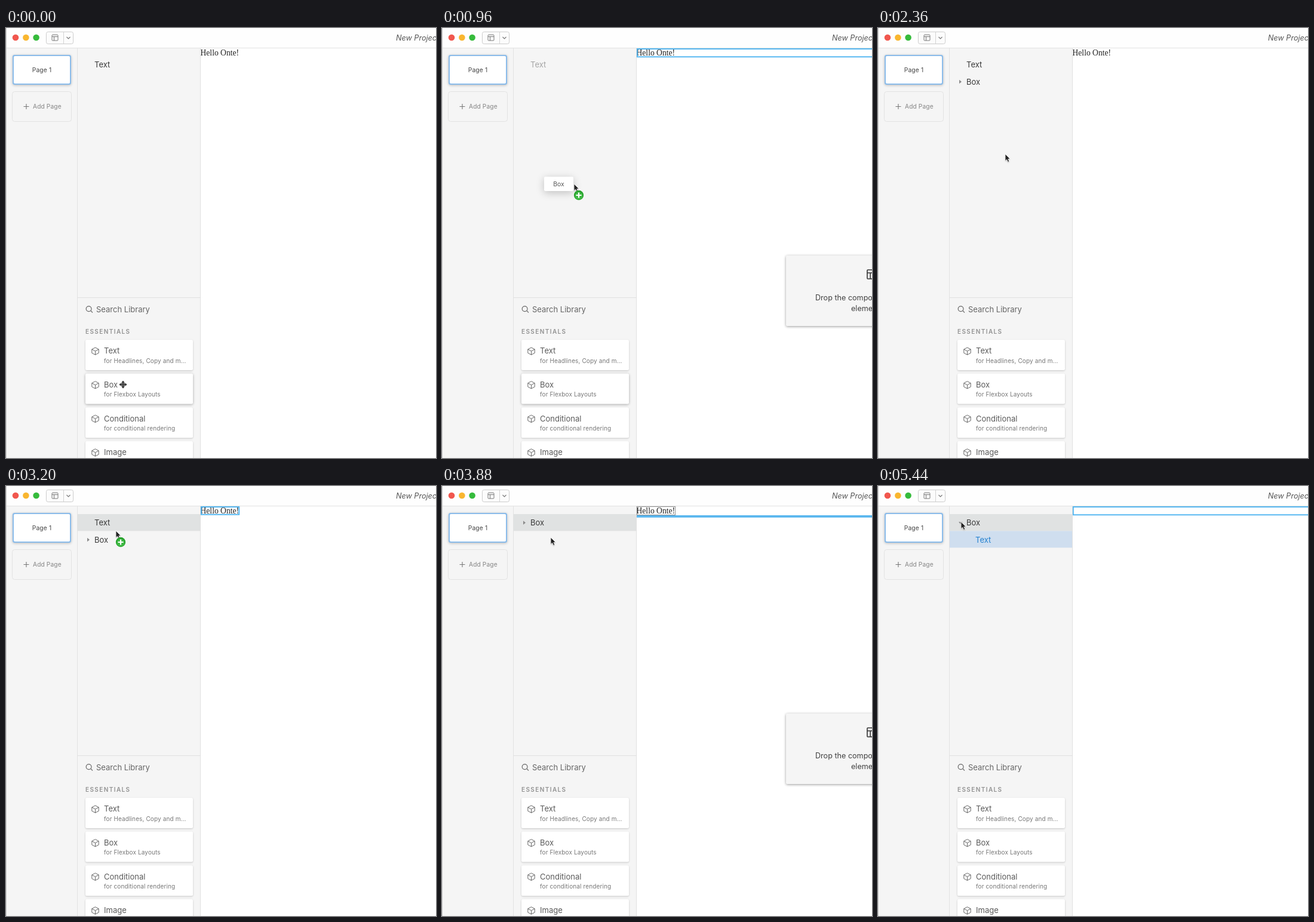
Write an HTML page with a canvas that moves like this. It is 720 px wide and 720 px high and loops after 5480 ms.

```html
<!DOCTYPE html>
<html lang="en">
<head>
<meta charset="utf-8">
<title>Page builder</title>
<style>
  html, body { margin: 0; width: 100%; height: 100%; overflow: hidden; background: #fff; }
  canvas { display: block; width: 720px; height: 720px; }
</style>
</head>
<body>
<canvas id="stage"></canvas>
<script>
const LOOP = 5480, STEP = 40;
const UI = 'Inter, "Open Sans", sans-serif';
const SERIF = '"Liberation Serif", serif';
const BLUE = '#50b5f1';

const canvas = document.getElementById('stage');
const ctx = canvas.getContext('2d');
const ratio = window.devicePixelRatio || 1;
canvas.width = canvas.height = 720 * ratio;

// Pointer path: time, x, y
const path = [
  [0, 196, 597], [320, 196, 597], [560, 198, 582], [760, 212, 410],
  [960, 221, 261], [1120, 222, 236], [1240, 222, 236], [1760, 213, 211],
  [2360, 213, 211], [2840, 184, 66], [3040, 184, 66], [3200, 184, 75],
  [3440, 182, 86], [4040, 182, 86], [4440, 156, 70], [4880, 139, 60],
  [LOOP, 139, 60]
];

function pointerAt(t) {
  const i = Math.max(1, path.findIndex(p => p[0] > t));
  const [t0, x0, y0] = path[i - 1], [t1, x1, y1] = path[i];
  const k = (t - t0) / (t1 - t0);
  return { x: x0 + (x1 - x0) * k, y: y0 + (y1 - y0) * k };
}

function rect(x, y, w, h, color) {
  ctx.fillStyle = color;
  ctx.fillRect(x, y, w, h);
}

function frame(x, y, w, h, color, width) {
  ctx.strokeStyle = color;
  ctx.lineWidth = width;
  ctx.strokeRect(x, y, w, h);
}

function round(x, y, w, h, r, fill, stroke, width = 1) {
  ctx.beginPath();
  ctx.roundRect(x, y, w, h, r);
  if (fill) { ctx.fillStyle = fill; ctx.fill(); }
  if (stroke) { ctx.strokeStyle = stroke; ctx.lineWidth = width; ctx.stroke(); }
}

function raised(x, y, w, h, r, fill, blur, drop, alpha) {
  ctx.save();
  ctx.shadowColor = `rgba(0,0,0,${alpha})`;
  ctx.shadowBlur = blur * ratio;
  ctx.shadowOffsetY = drop * ratio;
  round(x, y, w, h, r, fill);
  ctx.restore();
}

function disc(x, y, r, color) {
  ctx.beginPath();
  ctx.arc(x, y, r, 0, Math.PI * 2);
  ctx.fillStyle = color;
  ctx.fill();
}

// Strokes several polylines, each a flat list of coordinates
function lines(color, width, ...polys) {
  ctx.strokeStyle = color;
  ctx.lineWidth = width;
  ctx.beginPath();
  for (const p of polys) {
    ctx.moveTo(p[0], p[1]);
    for (let i = 2; i < p.length; i += 2) ctx.lineTo(p[i], p[i + 1]);
  }
  ctx.stroke();
}

function shape(points, color) {
  ctx.beginPath();
  for (let i = 0; i < points.length; i += 2) ctx.lineTo(points[i], points[i + 1]);
  ctx.closePath();
  ctx.fillStyle = color;
  ctx.fill();
}

// Text placed by the middle of its capitals
function label(str, x, mid, size, color, opt = {}) {
  ctx.font = `${opt.style || ''} ${opt.weight || 400} ${size}px ${UI}`;
  ctx.letterSpacing = `${opt.space || 0}px`;
  ctx.textAlign = opt.align || 'left';
  ctx.fillStyle = color;
  ctx.fillText(str, x, mid + size * 0.364);
  ctx.letterSpacing = '0px';
}

function cube(x, y) {
  lines('#666', 1,
    [x, y - 6, x + 5.7, y - 3, x + 5.7, y + 3.2, x, y + 6.2, x - 5.7, y + 3.2, x - 5.7, y - 3, x, y - 6],
    [x - 5.7, y - 3, x, y, x + 5.7, y - 3], [x, y, x, y + 6.2]);
}

function card(title, note, y, hover) {
  raised(133, y, 180, 51, 2.5, '#fff', hover ? 4 : 3, 1, hover ? 0.32 : 0.2);
  cube(149.5, y + 19);
  label(title, 164, y + 18.7, 13, '#5a5a5a');
  label(note, 164, y + 35, 10, '#777', { space: 0.12 });
}

function topBar() {
  rect(0, 0, 720, 33, '#fefefe');
  rect(0, 33, 720, 1, '#e2e2e2');
  disc(16, 16, 5.3, '#f1574e');
  disc(33.4, 16, 5.3, '#f9b62f');
  disc(50.6, 16, 5.3, '#36bb3c');
  raised(67.5, 7, 45, 19, 3, '#fdfdfd', 1.5, 0.5, 0.15);
  round(67.5, 6.5, 45, 20, 3, '#fcfcfc', '#cfcfcf');
  lines('#d2d2d2', 1, [96.5, 7, 96.5, 26]);
  round(77, 11.5, 10, 9.5, 1, null, '#777');
  lines('#777', 1, [77, 14.5, 87, 14.5], [80.5, 14.5, 80.5, 21]);
  lines('#777', 1.1, [101.5, 15, 104.5, 18, 107.5, 15]);
  label('New Project', 653, 16, 12.6, '#555', { style: 'italic' });
}

function pages() {
  rect(0, 34, 119, 686, '#f5f5f5');
  raised(11, 45, 98, 50, 4, '#8bbcea', 4, 1, 0.25);
  round(12, 46, 96, 48, 3, '#fff', '#8bbcea', 2);
  label('Page 1', 60, 70.5, 10.3, '#444', { space: 0.12, align: 'center' });
  round(10.5, 106.5, 99, 50, 4, '#f5f5f5', '#e3e3e3');
  lines('#777', 1.1, [29.5, 131.5, 38.5, 131.5], [34, 127, 34, 136]);
  label('Add Page', 45, 131.5, 10.2, '#858585', { space: 0.12 });
}

function library(hover) {
  rect(120, 451, 205, 1, '#e0e0e0');
  ctx.beginPath();
  ctx.arc(138.6, 470.2, 4.4, 0, Math.PI * 2);
  ctx.strokeStyle = '#666';
  ctx.lineWidth = 1.2;
  ctx.stroke();
  lines('#666', 1.2, [141.8, 473.4, 145, 476.5]);
  label('Search Library', 151, 471, 13, '#666');
  label('ESSENTIALS', 133, 508, 10, '#929292', { weight: 600, space: 1.4 });
  card('Text', 'for Headlines, Copy and m...', 522, false);
  card('Box', 'for Flexbox Layouts', 578.6, hover);
  card('Conditional', 'for conditional rendering', 635.2, false);
  card('Image', 'for Pictures', 691.8, false);
}

function row(name, y, x = 148, color = '#383838') {
  label(name, x, y, 13, color);
}

function closedMark(y) {
  shape([136, y - 3.2, 140, y, 136, y + 3.2], '#8b8b8b');
}

function tree(s) {
  if (s.hover) rect(120, 47, 205, 28.3, '#e0e2e2');
  if (!s.moved) {
    row('Text', 61.5, 148, s.dim ? '#a5a5a5' : undefined);
    if (s.boxRow) {
      if (s.boxHot) rect(120, 75.3, 205, 28, '#e0e2e2');
      row('Box', 90, 148);
      closedMark(90);
    }
    return;
  }
  row('Box', 61.5);
  if (s.open) {
    shape([135, 60, 141.4, 60, 138.2, 64], '#8b8b8b');
    rect(120, 75.3, 205, 28, '#cfdeef');
    row('Text', 90, 163, '#2380cf');
  } else {
    closedMark(61.5);
  }
}

function dropHint() {
  raised(576, 381, 320, 118, 2, '#f5f5f5', 4, 1, 0.4);
  round(712, 405, 15, 15, 1, null, '#333', 1.6);
  lines('#333', 1.6, [712, 410, 727, 410], [717.2, 410, 717.2, 420]);
  label('Drop the component', 625, 451, 12.6, '#404040');
  label('element', 685, 469.7, 12.6, '#404040');
}

function preview(s) {
  rect(326, 34, 394, 686, '#fff');
  if (s.greeting) {
    ctx.font = `13.6px ${SERIF}`;
    ctx.textAlign = 'left';
    ctx.fillStyle = '#222';
    ctx.fillText('Hello Onte!', 325.5, 46);
  }
  if (s.rootLine) frame(326.8, 35, 410, 13.3, BLUE, 1.9);
  if (s.textLine) frame(326.8, 35, 63.4, 12.8, BLUE, 1.9);
  if (s.picked) frame(326.5, 34.5, 64, 14, '#8f8f8f', 1);
  if (s.bar) rect(326, 49, 394, 3.8, '#59b6ee');
  if (s.hint) dropHint();
}

function arrow(x, y) {
  const outline = [0, 0, 0, 11.5, 2.6, 9.2, 4.6, 13.4, 6.8, 12.4, 4.9, 8.4, 8.2, 8.2]
    .map((v, i) => v + (i % 2 ? y : x));
  ctx.save();
  ctx.shadowColor = 'rgba(0,0,0,.3)';
  ctx.shadowBlur = 2 * ratio;
  ctx.shadowOffsetY = ratio;
  shape(outline, '#222');
  ctx.restore();
  ctx.strokeStyle = '#fff';
  ctx.lineWidth = 0.8;
  ctx.stroke();
}

function moveCursor(x, y) {
  const cross = [[x - 5, y, x + 5, y], [x, y - 5, x, y + 5]];
  lines('#fff', 4, ...cross);
  lines('#2b2b2b', 1.6, ...cross);
  for (let i = 0; i < 4; i++) {
    ctx.save();
    ctx.translate(x, y);
    ctx.rotate(i * Math.PI / 2);
    shape([0, -6.5, 2.7, -3.5, -2.7, -3.5], '#2b2b2b');
    ctx.restore();
  }
  frame(x - 2.3, y - 2.3, 4.6, 4.6, '#2b2b2b', 1);
}

function badge(x, y) {
  disc(x, y, 8.8, 'rgba(255,255,255,.8)');
  disc(x, y, 8.2, '#27a02c');
  disc(x, y + 1, 6.6, '#3fb944');
  lines('#fff', 2.2, [x - 4.5, y, x + 4.5, y], [x, y - 4.5, x, y + 4.5]);
}

function pointer(p, s) {
  if (s.ghost) {
    raised(p.x - 50, p.y - 12, 49, 24, 2, '#fff', 14, 3, 0.22);
    label('Box', p.x - 25.5, p.y + 0.5, 10.3, '#555', { space: 0.12, align: 'center' });
  }
  if (s.grab) moveCursor(p.x, p.y);
  else arrow(p.x, p.y);
  if (s.badge) badge(p.x + 8, p.y + 19);
}

function stateAt(t) {
  const within = (a, b) => t >= a && t < b;
  const addBox = within(720, 1800), nest = within(3320, 4040);
  return {
    grab: t < 440,
    ghost: within(440, 1800),
    badge: addBox || within(3120, 3720),
    dim: addBox,
    boxRow: t >= 1840,
    boxHot: within(3320, 3720),
    moved: t >= 3720,
    open: t >= 5160,
    hover: within(2800, 3320) || t >= 3720,
    cardHover: t < 1840,
    greeting: t < 4040,
    rootLine: addBox || t >= 4040,
    textLine: within(2800, 3320),
    picked: nest,
    bar: nest,
    hint: addBox || nest
  };
}

function draw(now) {
  const t = Math.floor((now % LOOP) / STEP) * STEP;
  const s = stateAt(t);
  ctx.setTransform(ratio, 0, 0, ratio, 0, 0);
  rect(0, 0, 720, 720, '#fff');
  preview(s);
  topBar();
  pages();
  rect(120, 34, 205, 686, '#f5f5f5');
  tree(s);
  library(s.cardHover);
  rect(119, 34, 1, 686, '#e2e2e2');
  rect(325, 34, 1, 686, '#e0e0e0');
  rect(0, 0, 1, 720, '#cfcfcf');
  pointer(pointerAt(t), s);
}

const start = performance.now();
function tick() {
  draw(performance.now() - start);
  requestAnimationFrame(tick);
}
tick();
</script>
</body>
</html>
```
